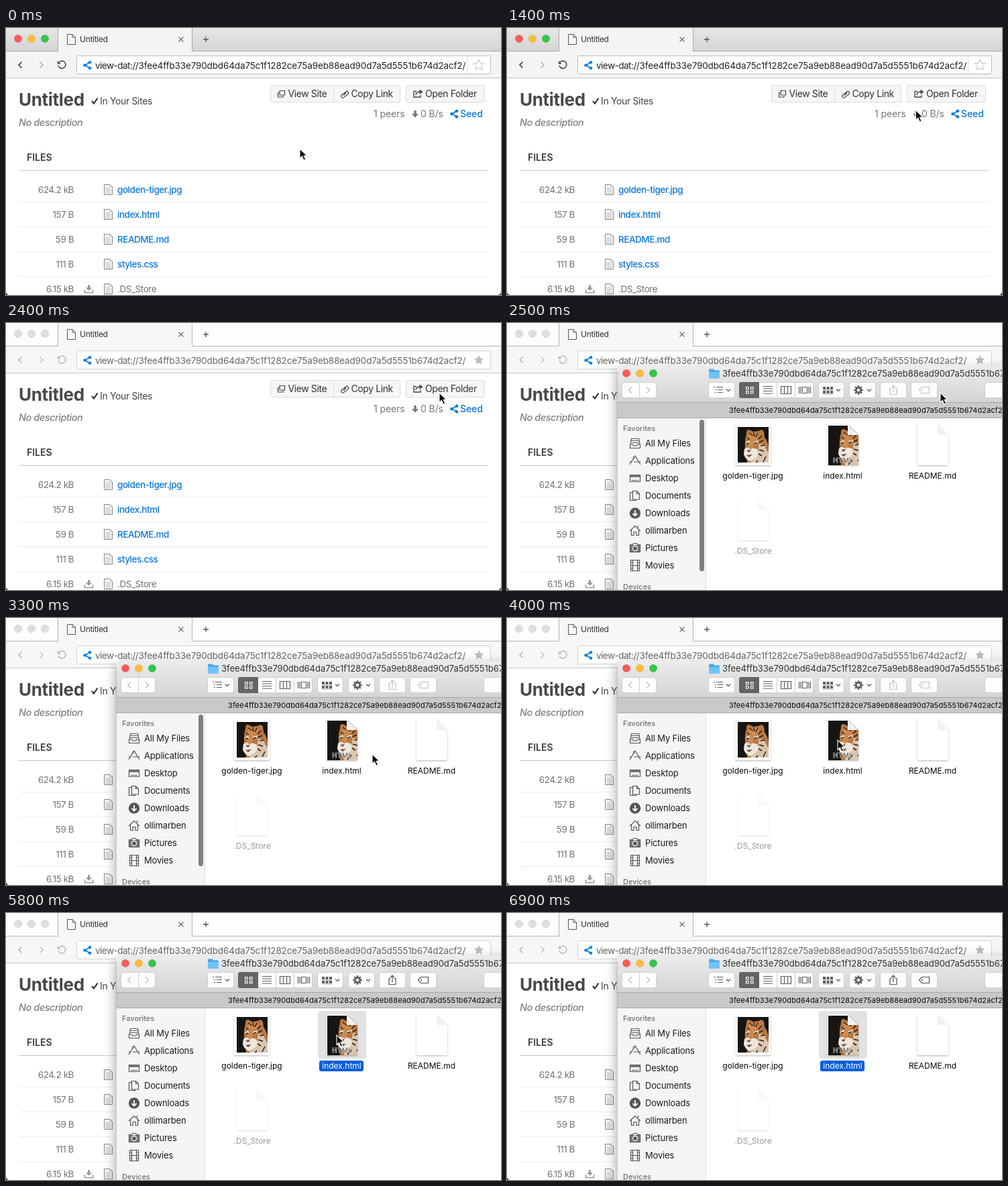
Recreate the animation shown at these times as an HTML page. Size 738 px wide and 398 px high, loop 7400 ms.

```html
<!DOCTYPE html>
<html lang="en">
<head>
<meta charset="utf-8">
<style>
html, body { margin: 0; width: 100%; height: 100%; overflow: hidden; background: #fff; }
svg { display: block; width: 738px; height: 398px; font-family: Inter, Roboto, sans-serif; }
text { white-space: pre; }
.line { fill: none; stroke: currentColor; stroke-width: 1.4; }
.btn { fill: #f6f6f6; stroke: #dcdcdc; }
.tool { fill: #fdfdfd; stroke: #c6c6c6; stroke-width: .8; }
.page { font-size: 14px; letter-spacing: -.4px; fill: #333; }
.row { font-size: 13.5px; letter-spacing: -.46px; fill: #737373; }
.url { font-size: 13.5px; letter-spacing: -.14px; }
.stat { font-size: 14px; letter-spacing: -.1px; fill: #777; }
.side { font-size: 13px; letter-spacing: -.17px; fill: #1c1c1c; }
.head { font-size: 11px; font-weight: 500; fill: #707070; }
.label { font-size: 12px; text-anchor: middle; fill: #0a0a0a; }
.link { fill: #0a76d8; font-weight: 500; }
.end { text-anchor: end; }
</style>
</head>
<body>
<svg viewBox="0 0 738 398">
  <defs>
    <linearGradient id="bar" x2="0" y2="1"><stop stop-color="#e6e6e6"/><stop offset="1" stop-color="#d4d4d4"/></linearGradient>
    <linearGradient id="chrome" x2="0" y2="1"><stop stop-color="#ececec"/><stop offset="1" stop-color="#d4d4d4"/></linearGradient>
    <filter id="shadow" x="-10%" y="-10%" width="120%" height="120%"><feDropShadow dx="0" dy="6" stdDeviation="9" flood-opacity=".38"/></filter>
    <filter id="soft" x="-20%" y="-20%" width="140%" height="140%"><feDropShadow dx="0" dy="1" stdDeviation="1" flood-opacity=".3"/></filter>
    <filter id="blur"><feGaussianBlur stdDeviation=".7"/></filter>
    <clipPath id="photoClip"><path d="M0 0h46v53H0z"/></clipPath>
    <clipPath id="docClip"><path d="M0 0h30l16 16v45H0z"/></clipPath>
    <g id="share"><path class="line" d="M10 2 3 6.500l7 4.500" style="stroke-width:1.700"/><circle cx="10" cy="2.200" r="2.300"/><circle cx="2.500" cy="6.500" r="2.300"/><circle cx="10" cy="10.800" r="2.300"/></g>
    <g id="paper"><path d="M.5.5h8.500l3.500 3.500v11.500H.5z" fill="#f7f7f7" stroke="#858585"/><path d="M9 .5v3.500h3.500M2.500 5.500h6M2.500 7.500h8M2.500 9.500h8M2.500 11.500h8M2.500 13.500h8" fill="none" stroke="#b4b4b4" stroke-width=".8"/></g>
    <g id="doc" filter="url(#soft)"><path d="M0 0h30l16 16v45H0z" fill="#fff"/><path d="M30 0v16h16z" fill="#f1f1f1"/></g>
    <g id="tiger" filter="url(#blur)">
      <path d="M13 8q1-6 6-3l4 2 8-1q5-4 8 1l1 8q6 8 6 18v30H12l2-14-5-8 2-12q-1-9 2-19z" fill="#b87843"/>
      <path d="M32 25q8 0 10 8l4 6v24H18l2-14 9-6z" fill="#d9c5ad"/>
      <path d="M10 33q5-5 11-2l8 2q4 8-2 13l-9 5q-8-4-9-11z" fill="#eee7dd"/>
      <path d="M16 12l8-4 8 3-4 8-7 14-5-1z" fill="#cc8a50"/>
      <path d="M12 23l5-3 1 4-5 2zM24 22l7-2-1 4-6 2z" fill="#efe2d0"/>
      <path d="M17 9l6 4M24 8l1 6M30 9l-3 6M36 13l-5 5M38 20l-6 3M40 27l-6 1M39 36l-7-2M36 43l-5-3M42 44l-4 8M30 50l-6 7M14 16l4 3M13 25l4-1M24 25l5-2" stroke="#2a1c15" stroke-width="1.500"/>
      <path d="M13 35l7-1-3 4zM13 42l9-1-5 4z" fill="#6d463b"/>
    </g>
  </defs>

  <path d="M0 0h738v398H0z" fill="#fff"/>
  <g id="browser"></g>
  <g id="page"></g>
  <g id="finder"></g>
  <rect id="scroll" x="287" y="144" width="7" height="226" rx="3.500" fill="#808080"/>
  <path id="cursor" d="M0 0v14.500l3.400-3.200 2.600 6 2.700-1.200-2.600-5.700h4.700z" fill="#080808" stroke="#fff" stroke-width="1.100"/>
</svg>
<script>
const $ = id => document.getElementById(id);
const hash = '3fee4ffb33e790dbd64da75c1f1282ce75a9eb88ead90d7a5d5551b674d2acf2';
const text = (x, y, s, cls = '', style = '') => `<text x="${x}" y="${y}" class="${cls}" style="${style}">${s}</text>`;
const line = (d, color, w = 1.4) => `<path class="line" d="${d}" style="color:${color};stroke-width:${w}"/>`;
const fill = (d, color) => `<path d="${d}" fill="${color}"/>`;
const use = (id, x, y, color = '#000') => `<use href="#${id}" x="${x}" y="${y}" style="color:${color}" fill="${color}"/>`;
const box = (x, y, w, h, cls, r = 2.5, style = '') =>
  `<rect x="${x}" y="${y}" width="${w}" height="${h}" rx="${r}" class="${cls}" style="${style}"/>`;
const lights = (x, y, colors) => colors.map((c, i) =>
  `<circle cx="${x + 20 * i}" cy="${y}" r="5.800" fill="${c}" stroke="#000" stroke-opacity=".12" stroke-width=".6"/>`).join('');
const bright = ['#fc5b57', '#fdbb3e', '#34c648'];

function browser(active) {
  const ink = active ? '#444' : '#bababa', faint = active ? '#b5b5b5' : '#c8c8c8';
  const edge = active ? '#a8a8a8' : '#b4b4b4', face = active ? '#f4f4f4' : '#f7f7f7';
  const urlInk = `fill:${active ? '#222' : '#666'}`;
  return fill('M0 0h738v35H0z', active ? 'url(#bar)' : '#fdfdfd') +
    fill('M0 35h738v39H0zM78 0h199v36H78z', face) +
    line('M0 34.500h77.500V0M277.500 0v34.500H738', edge, 1) + line('M0 74.500h738', '#c4c4c4', 1) +
    lights(18, 16, active ? bright : Array(3).fill('#dedede')) +
    line('M91.500 9.500h7.500l4.500 4.500v10.500h-12zM99 9.500v4.500h4.500', '#555', 1) +
    text(110, 21, 'Untitled', '', 'font-size:12px;letter-spacing:-.3px;fill:#333') +
    line('M257.500 13.500l7 7M264.500 13.500l-7 7', '#666', 1.1) +
    line('M294 17h8M298 13v8', '#555', 1.3) +
    line('M23.500 50.500 19 55l4.500 4.500', ink, 1.7) + line('M50.500 50.500 55 55l-4.500 4.500', faint, 1.7) +
    line('M78.500 52a5.500 5.500 0 1 1-.5 4M77.500 49.500v3.500h3.500', ink, 1.5) +
    `<rect x="105.500" y="41.500" width="617" height="27" rx="2" fill="#fff" stroke="${active ? '#bbb' : '#d2d2d2'}"/>` +
    (active ? line('M687.500 42v26', '#ddd', 1) : '') + use('share', 115, 49, '#0a7fe0') +
    text(133, 61, 'view-dat://', 'url', urlInk + ';letter-spacing:-.5px') + text(197.5, 61, hash + '/', 'url', urlInk) +
    `<path transform="translate(705 55.500) scale(${active ? 1 : .8})" d="M0-8.500l2.300 5.300 5.700.5-4.300 3.800 1.300 5.700-5-3-5 3 1.300-5.700-4.300-3.800 5.700-.5z" fill="${active ? 'none' : '#bbb'}" stroke="#bbb"/>`;
}

function page() {
  const files = [['624.2 kB', 'golden-tiger.jpg'], ['157 B', 'index.html'], ['59 B', 'README.md'],
    ['111 B', 'styles.css'], ['6.15 kB', '.DS_Store']];
  const rows = files.map(([size, name], i) => {
    const y = 241 + 37 * i;
    return text(101, y + 5, size, 'row end') + use('paper', 146, y - 8) +
      text(166, y + 5, name, i < 4 ? 'row link' : 'row') +
      (i < 4 ? line(`M19 ${y + 18.5}h700`, '#ededed', 1) : '');
  }).join('');
  return text(19, 115.8, 'Untitled', '', 'font-size:26px;font-weight:700;letter-spacing:-.3px;fill:#484848') +
    line('M128 109l3 3.500 5.500-8', '#333', 2.2) +
    text(140, 114, 'In Your Sites', 'page', 'letter-spacing:-.35px;fill:#444') +
    text(19, 146, 'No description', '', 'font-size:14.5px;font-style:italic;font-weight:500;letter-spacing:-.45px;fill:#808080') +
    box(394.5, 85.5, 193, 25, 'btn') + line('M488.500 86v24', '#dcdcdc', 1) + box(596.5, 85.5, 117, 25, 'btn') +
    line('M408 93.500h7.500v6.500h-7.500zM407 96.500h-1.500v6.500h7.500v-2', '#444', 1.2) +
    text(420.5, 103, 'View Site', 'page') +
    line('M504 97.500l2.500-2.500a2.300 2.300 0 0 1 3.300 3.300l-3 3M506 97.500l-3 0-2.500 2.500a2.300 2.300 0 0 0 3.300 3.300l2.500-2.500M503 100.500l4-4', '#444', 1.2) +
    text(514.5, 103, 'Copy Link', 'page') +
    line('M612 94.500h-4v8.500h10v-3M611 100q0-5 7-5', '#444', 1.4) + fill('M616.500 91.500l5 3.700-5 3.700z', '#444') +
    text(625, 103, 'Open Folder', 'page') +
    text(548, 133, '1 peers', 'stat') + fill('M608.300 123h3.400v5h3.300l-5 5.500-5-5.500h3.300z', '#777') +
    text(618, 133, '0 B/s', 'stat') + use('share', 662, 121.5, '#0a76d8') + text(677, 133, 'Seed', 'stat link') +
    text(31, 198, 'FILES', '', 'font-size:14px;font-weight:600;fill:#3c3c3c') +
    line('M19 212.500h700', '#c8c8c8', 1) + rows +
    line('M117.500 390v4.500h12V390', '#999', 1.6) + fill('M122 383h3v4h3l-4.500 4.500-4.500-4.500h3z', '#999') +
    fill('M0 394v4h4q-3-1-4-4M738 394v4h-4q3-1 4-4', '#333');
}

function sidebar() {
  const items = [
    ['All My Files', 'M186 172.500h10M185.500 175.500h11M185.500 178.500h11M183.500 181h4l1 2h5l1-2h4v5.500h-15zM184 181l1.500-9M198 181l-1.500-9'],
    ['Applications', 'M183 211l8-13 8 13M182.500 207h4M189 207h10.500M188 199l2 3'],
    ['Desktop', 'M183.500 226.500h15v10h-15zM184 229h14M186 234.500h10'],
    ['Documents', 'M187.500 250.500h6l4 4v8.500h-10zM193.500 250.500v4h4M187 252.500h-3.500v12h9v-1.500'],
    ['Downloads', ''],
    ['ollimarben', 'M183 310l8-7.500 8 7.500M185.500 308.500v8h3.500v-5h4v5h3.500v-8M195.500 305v-3'],
    ['Pictures', 'M183.500 330.500h4l1-2h5l1 2h4v11h-15z'],
    ['Movies', 'M184.500 353.500h13v16h-13zM187.500 353.500v16M194.500 353.500v16M187.500 361.500h7M184.500 357h3M184.500 361.500h3M184.500 366h3M194.500 357h3M194.500 361.500h3M194.500 366h3']];
  return text(173, 161, 'Favorites', 'head') + text(173, 397, 'Devices', 'head') +
    items.map(([name, d], i) => line(d, '#555', 1.2) + text(206, 184 + 26 * i, name, 'side')).join('') +
    fill('M184 227h14v3h-14z', '#777') +
    `<circle cx="191" cy="283.500" r="8.200" fill="#555"/>` + line('M191 279v8M187.500 284l3.500 3.500 3.500-3.500', '#fff', 1.8) +
    fill('M184 331h14v10h-14z', '#777') + `<circle cx="191" cy="336" r="3.500" fill="#555" stroke="#f4f4f4" stroke-width="1.300"/>`;
}

function toolbar(enabled) {
  const ink = '#606060', act = enabled ? '#555' : '#c2c2c2';
  const down = x => line(`M${x} 98.500l3 3 3-3`, ink, 1.3);
  let teeth = '', tiles = '';
  for (let i = 0; i < 8; i++) {
    const a = i * Math.PI / 4, c = Math.cos(a), s = Math.sin(a);
    teeth += `M${524 + 4 * c} ${100 + 4 * s}L${524 + 6.8 * c} ${100 + 6.8 * s}`;
  }
  for (let i = 0; i < 6; i++) tiles += `M${471 + i % 3 * 5.5} ${i < 3 ? 95 : 101}h4v4h-4z`;
  return [[171, 52], [300, 40], [346, 111], [464, 39], [510, 40], [556, 40], [602, 40], [712, 40]]
    .map(([x, w]) => box(x + .5, 88.5, w - 1, 23, 'tool', 3.5)).join('') +
    line('M197.500 89v22M402.500 89v22M429.500 89v22', '#ccc', 1) +
    line('M186 95.500l-4.500 4.500 4.500 4.500M208 95.500l4.500 4.500-4.500 4.500', '#c4c4c4', 1.5) +
    line('M308 95.500h2M312 95.500h10M310 99.500h2M314 99.500h8M310 103.500h2M314 103.500h8', ink, 1.2) + down(327) +
    fill('M349 88h27v24h-27q-3 0-3-3V91q0-3 3-3z', '#646464') +
    [0, 1, 2, 3].map(i => line(`M${356.5 + i % 2 * 7} ${95.5 + (i >> 1) * 6}h3.500v3.500h-3.500z`, '#fff', 1.2)).join('') +
    line('M382 94.500h14M382 98h14M382 101.500h14M382 105h14', ink, 1.2) +
    line('M408.500 94.500h15v11h-15zM413.500 95v10M418.500 95v10', ink, 1.2) +
    line('M435.500 95v10M438 95v10M440.500 95.500h7v9h-7zM450 95v10M452.500 95v10', ink, 1.2) +
    fill(tiles, ink) + line('M471 106h15M471 100h15', '#999', .8) + down(491) +
    line(teeth, ink, 2.6) + `<circle cx="524" cy="100" r="3.700" fill="none" stroke="${ink}" stroke-width="2.800"/>` + down(537) +
    line('M573.500 97.500h-2.500v9h10v-9h-2.500M576 103v-9.500M573 96l3-3 3 3', act, 1.2) +
    line('M614.500 100l4-4.500h11v9h-11z', act, 1.2) + `<circle cx="619" cy="100" r="1" fill="${act}"/>`;
}

function finder(selected, enabled) {
  return `<path d="M164 398V70q0-6 6-6h600v354H164z" fill="#fff" filter="url(#shadow)"/>` +
    fill('M164 118V70q0-6 6-6h568v54z', 'url(#chrome)') + fill('M164 118h574v24H164z', '#c9c9c9') +
    line('M164 118.500h574M164 141.500h574', '#a9a9a9', 1) +
    fill('M164 142h133v256H164z', '#f5f5f5') + line('M296.500 142v256', '#dcdcdc', 1) + line('M164.500 72v326', '#aaa', .6) +
    lights(178, 75, bright) +
    fill('M301 70q0-1.500 1.500-1.500h5l2 2h6q1.500 0 1.500 1.500v9q0 1.500-1.500 1.500h-13q-1.500 0-1.500-1.500z', '#4ba9e8') +
    fill('M301 73h16v8q0 1.500-1.500 1.500h-13q-1.500 0-1.500-1.500z', '#70c3f5') +
    text(321, 80, hash, '', 'font-size:13px;letter-spacing:-.03px;fill:#333') +
    text(331, 134, hash, '', 'font-size:11px;letter-spacing:.11px;fill:#0a0a0a') +
    toolbar(enabled) + sidebar() +
    (selected ? box(465, 146, 72, 71, '', 4, 'fill:#e2e2e2') + box(467, 220, 66, 16, '', 3, 'fill:#0b5fd9') : '') +
    fill('M340 151h53v61h-53z" filter="url(#soft)', '#fff') +
    `<g transform="translate(344 155)" clip-path="url(#photoClip)">${fill('M0 0h46v53H0z', '#171513')}<use href="#tiger"/></g>` +
    use('doc', 478, 151) +
    `<g transform="translate(478 151)" clip-path="url(#docClip)">${fill('M1 2h45v59H1z', '#171513')}` +
    `<use href="#tiger" x="7" y="3"/>${fill('M30 0v16h16V0z', '#f0f0f0')}</g>` +
    text(501.5, 208, 'HTML', 'label', 'font-size:9.5px;letter-spacing:.8px;fill:#555;stroke:#ddd;stroke-width:1px;paint-order:stroke') +
    use('doc', 612, 151) + `<g opacity=".45">${use('doc', 344, 263)}</g>` +
    text(366.5, 232, 'golden-tiger.jpg', 'label') + text(500.5, 232, 'index.html', 'label', selected ? 'fill:#fff' : '') +
    text(634.5, 232, 'README.md', 'label') + text(367, 344, '.DS_Store', 'label', 'fill:#999');
}

// Cursor legs: start ms, end ms, destination
const home = [438, 180];
const legs = [[1000, 1570, 656, 107], [2100, 2300, 646, 104], [2800, 3300, 546, 203], [3300, 3700, 493, 182], [6100, 6800, 298, 158]];
const ramp = (t, a, b) => Math.min(1, Math.max(0, (t - a) / (b - a)));
function cursorAt(t) {
  let [x, y] = home;
  for (const [a, b, tx, ty] of legs) {
    const p = ramp(t, a, b), k = p * p * (3 - 2 * p);
    x += (tx - x) * k;
    y += (ty - y) * k;
  }
  return [x, y];
}

const shown = {};
function show(id, key, html) {
  if (shown[id] === key) return;
  shown[id] = key;
  $(id).innerHTML = html();
}

$('page').innerHTML = page();
function draw(now) {
  const t = Math.floor(now % 7400 / 100) * 100;
  const active = t < 2300, open = t >= 2500, selected = t >= 4400, enabled = t >= 4600;
  show('browser', active, () => browser(active));
  show('finder', `${open} ${selected} ${enabled}`, () => open ? finder(selected, enabled) : '');
  $('scroll').setAttribute('opacity', open ? 1 - ramp(t, 3300, 3600) : 0);
  const [x, y] = cursorAt(t);
  $('cursor').setAttribute('transform', `translate(${x.toFixed(1)} ${y.toFixed(1)})`);
  $('cursor').style.display = t < 6900 ? '' : 'none';
  requestAnimationFrame(draw);
}
draw(performance.now());
</script>
</body>
</html>
```
